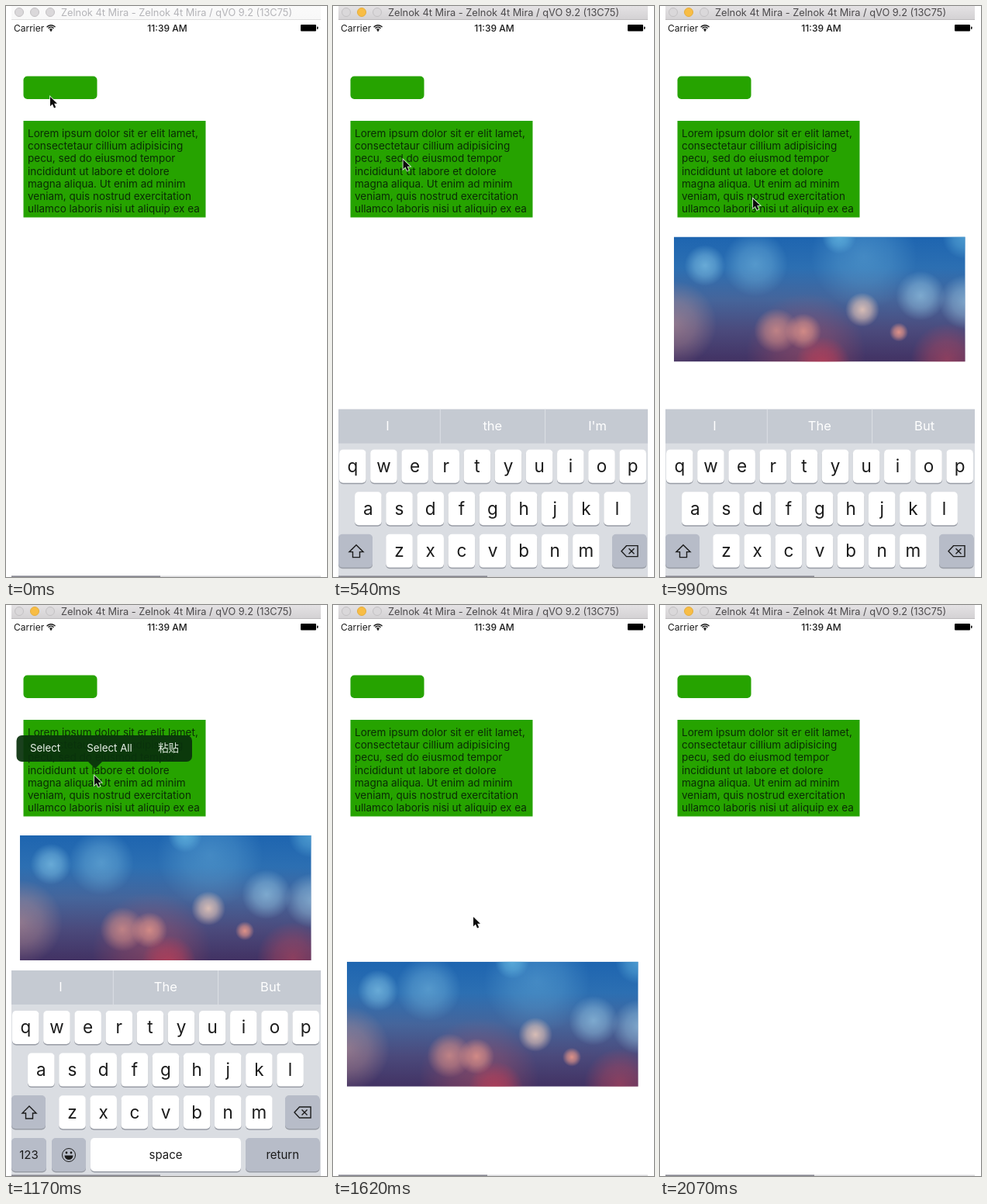
These frames come from a looping animation (414 by 736 pixels, 2160 ms). An HTML page with a canvas:

```html
<!DOCTYPE html>
<html>
<head>
<meta charset="utf-8">
<title>Keyboard and sliding panel</title>
<style>
html, body { margin: 0; width: 100%; height: 100%; overflow: hidden; background: #fff; }
canvas { display: block; }
</style>
</head>
<body>
<canvas id="stage" width="414" height="736"></canvas>
<script>
const c = document.getElementById('stage').getContext('2d');
const LOOP = 2160, STEP = 90, BOTTOM = 736;
const GREEN = '#26a300', INK = '#1b1b1b';
const DEVICE = 'Zelnok 4t Mira';
const TITLE = `${DEVICE} - ${DEVICE} / qVO 9.2 (13C75)`;
const LOREM = [
  'Lorem ipsum dolor sit er elit lamet,',
  'consectetaur cillium adipisicing',
  'pecu, sed do eiusmod tempor',
  'incididunt ut labore et dolore',
  'magna aliqua. Ut enim ad minim',
  'veniam, quis nostrud exercitation',
  'ullamco laboris nisi ut aliquip ex ea'
];

// Places the pointer passes: step, x, y
const POINTER = [[0, 57, 117], [4, 52, 105], [8, 129, 291], [13, 114, 220], [16, 203, 329], [18, 181, 402]];
// Blurred lights in the panel: x, y, radius
const LIGHTS = [[245, 25, 62], [105, 35, 38], [40, 37, 24], [213, 0, 20], [375, 0, 26], [318, 76, 29],
  [377, 84, 32], [170, 150, 70], [0, 112, 50], [132, 121, 26], [167, 122, 21], [243, 94, 20],
  [290, 123, 11], [192, 164, 32], [352, 158, 42]];

const clamp = u => Math.min(1, Math.max(0, u));
const easeOut = u => 1 - (1 - clamp(u)) ** 2;
const easeIn = u => clamp(u) ** 2;
const spring = u => u < 0 ? 0 : 1 - Math.exp(-1.4 * u) * Math.cos(2 * u);

// How far each sliding part is up: 0 hidden, 1 at rest
const keyboardUp = (t, rise, fall) => easeOut((t - rise) / 3.5) - easeIn((t - fall) / 3.5);
const panelUp = (t, rise, fall) => spring(t - rise) * (1 - easeIn((t - fall) / 3));

function pointerAt(t) {
  const i = POINTER.findIndex(p => p[0] > t);
  if (i < 0) return POINTER.at(-1).slice(1);
  const [t0, x0, y0] = POINTER[i - 1], [t1, x1, y1] = POINTER[i];
  const u = (t - t0) / (t1 - t0);
  return [x0 + (x1 - x0) * u, y0 + (y1 - y0) * u];
}

function text(s, x, y, size, color, align = 'left', weight = 400) {
  c.font = `${weight} ${size}px Inter, "Noto Sans CJK SC", "Noto Sans CJK", sans-serif`;
  c.fillStyle = color;
  c.textAlign = align;
  c.fillText(s, x, y);
}

function rect(x, y, w, h, color, r = 0) {
  c.fillStyle = color;
  c.beginPath();
  c.roundRect(x, y, w, h, r);
  c.fill();
}

function shade(height, colors) {
  const g = c.createLinearGradient(0, 0, 0, height);
  colors.forEach((s, i) => g.addColorStop(i / (colors.length - 1), s));
  return g;
}

function trace(points) {
  c.beginPath();
  points.forEach(p => c.lineTo(...p));
  c.closePath();
}

function outline(points) {
  trace(points);
  c.strokeStyle = INK;
  c.lineWidth = 1.4;
  c.stroke();
}

function disc(x, y, r, fill, stroke) {
  c.beginPath();
  c.arc(x, y, r, 0, 7);
  if (fill) { c.fillStyle = fill; c.fill(); }
  if (stroke) { c.strokeStyle = stroke; c.lineWidth = 1; c.stroke(); }
}

function titleBar(active) {
  rect(7, 0, 399, 18, shade(18, active ? ['#e4e2e4', '#d3d1d3'] : ['#fafafa', '#f8f8f8']));
  rect(7, 17, 399, 1, active ? '#bcbabc' : '#dedede');
  for (let i = 0; i < 3; i++) {
    const lit = active && i === 1;
    disc(17 + 20 * i, 8, 5.5, lit ? '#f8bd45' : '#dad8da', lit ? '#e5ad3c' : '#c3c1c3');
  }
  text(TITLE, 71, 13, 12.8, active ? '#4b494b' : '#b4b4b8');
}

function statusBar() {
  text('Carrier', 10, 33, 12, INK);
  c.strokeStyle = INK;
  c.lineWidth = 1.4;
  for (let r = 2.2; r < 8; r += 2.5) {
    c.beginPath();
    c.arc(58, 32, r, -Math.PI * .77, -Math.PI * .23);
    c.stroke();
  }
  disc(58, 31.5, 1.2, INK);
  text('11:39 AM', 208, 33, 12, INK, 'center', 500);
  rect(380, 24, 20, 8.5, '#000', 1);
  rect(401, 26.5, 1.5, 3.5, '#000', 1);
}

function fields(caret) {
  rect(22.5, 90.5, 95, 29.5, GREEN, 5);
  if (caret) rect(29, 98, 2, 16, '#277c78');
  rect(22.5, 148, 235, 124.5, GREEN);
  LOREM.forEach((s, i) => text(s, 28, 169 + i * 16.2, 13.5, '#0a2c05'));
}

// Lights are blue high up, cream in the middle and red near the bottom
function lightColor(y, alpha) {
  const low = y - 94;
  return low < 0 ? `hsla(201,65%,${62 + y * .2}%,${alpha})`
    : `hsla(${20 - low * .4},65%,${84 - low * .42}%,${alpha})`;
}

function panel(y) {
  c.save();
  c.translate(18, y);
  c.beginPath();
  c.rect(0, 0, 375.5, 161);
  c.clip();
  rect(0, 0, 376, 161, shade(161, ['#1e65b0', '#2c6fb2', '#45659b', '#4b4a7c', '#423263']));
  for (const [x, y, r] of LIGHTS) {
    const alpha = Math.min(.95, .15 + 14 / r);
    const glow = c.createRadialGradient(x, y, 0, x, y, r * 1.1);
    [1, .65, 0].forEach((k, i) => glow.addColorStop(i / 2, lightColor(y, alpha * k)));
    disc(x, y, r * 1.1, glow);
  }
  c.restore();
}

function key(x, y, w, label, size, special) {
  rect(x, y + 1, w, 43.5, '#989ca5', 5);
  rect(x, y, w, 43, special ? '#b7bcc8' : '#fff', 5);
  text(label, x + w / 2, y + 22 + size * .33, size, INK, 'center');
}

function smiley(x, y) {
  disc(x, y, 8.5, null, INK);
  disc(x - 3, y - 3, 1.4, INK);
  disc(x + 3, y - 3, 1.4, INK);
  c.beginPath();
  c.arc(x, y + .5, 5.5, 0, Math.PI);
  c.fill();
}

function keyboard(y, words) {
  c.save();
  c.beginPath();
  c.rect(7, 0, 399, BOTTOM);
  c.clip();
  c.translate(0, y);
  rect(7, 0, 399, 270, '#dadde2');
  rect(7, 0, 399, 44, '#c5cad2');
  words.forEach((s, i) => {
    if (i) rect(2.5 + i * 135.3, 0, 1, 44, '#dce0e5');
    text(s, 70.5 + i * 135.3, 27, 16.5, '#fff', 'center');
  });

  ['qwertyuiop', 'asdfghjkl', 'zxcvbnm'].forEach((row, r) => {
    const left = 206 - row.length * 20.07;
    [...row].forEach((s, i) => key(left + 2.7 + i * 40.15, 52 + r * 54.6, 34.6, s, 22.5));
  });
  key(7, 161, 44, '', 15, true);
  key(360, 161, 44.5, '', 15, true);
  outline([[30, 175], [39, 184], [34.5, 184], [34.5, 191], [25.5, 191], [25.5, 184], [21, 184]]);
  outline([[372, 183], [378.5, 176], [393, 176], [393, 190], [378.5, 190]]);
  outline([[381.5, 179.5], [388.5, 186.5]]);
  outline([[388.5, 179.5], [381.5, 186.5]]);

  key(7, 216, 45, '123', 15, true);
  key(59, 216, 44, '', 15, true);
  key(109, 216, 194, 'space', 15);
  key(309, 216, 95.5, 'return', 15, true);
  smiley(81, 238);
  c.restore();
}

function menu(alpha) {
  c.save();
  c.globalAlpha = alpha;
  c.fillStyle = 'rgba(9,50,12,.93)';
  c.beginPath();
  c.roundRect(13.5, 168, 226.5, 34, 7);
  c.moveTo(106, 202);
  c.lineTo(115, 211);
  c.lineTo(124, 202);
  c.fill();
  [['Select', 50.5], ['Select All', 133.5], ['粘贴', 209.5]]
    .forEach(([s, x]) => text(s, x, 189, 13.3, '#e8f0e8', 'center'));
  c.restore();
}

function loupe() {
  c.save();
  c.beginPath();
  c.rect(7, 18, 399, 718);
  c.clip();
  c.shadowColor = 'rgba(0,0,0,.35)';
  c.shadowBlur = 4;
  c.shadowOffsetY = 1;
  disc(48, 44, 60, '#fff', '#b5b8b5');
  c.shadowColor = 'transparent';
  c.beginPath();
  c.arc(48, 44, 59.5, 0, 7);
  c.clip();
  rect(14, 27.5, 120, 35, GREEN, 5);
  rect(22.5, 34, 2.5, 21, '#2878a0');
  c.restore();
}

function pointer(x, y) {
  c.save();
  c.translate(x, y);
  c.scale(.9, .9);
  trace([[0, 0], [0, 13.5], [3.2, 10.6], [5.6, 16], [8, 15], [5.7, 9.8], [10, 9.6]]);
  c.strokeStyle = 'rgba(255,255,255,.8)';
  c.lineWidth = 2;
  c.stroke();
  c.fillStyle = '#0c0c0c';
  c.fill();
  c.restore();
}

function draw(t) {
  const pressed = t >= 2 && t <= 4;
  const again = t >= 9;
  const keys = again ? keyboardUp(t, 9, 13.03) : keyboardUp(t, 2, 4.5);
  const slide = t < 17 ? panelUp(t, 7.18, 13) : panelUp(t, 17.58, 20);

  rect(0, 0, 414, BOTTOM, '#fff');
  statusBar();
  fields(pressed);
  panel(BOTTOM - 439 * slide);
  keyboard(BOTTOM - 265 * keys, again ? ['I', 'The', 'But'] : ['I', 'the', "I'm"]);
  if (t >= 12) menu(clamp((16.5 - t) / 2.3));
  if (pressed) loupe();
  titleBar(t > 0);
  rect(7, 734.5, 399, 1.5, '#d9d9dc');
  rect(7, 734.5, 192, 1.5, '#85858f');
  if (t < 23) pointer(...pointerAt(t));
}

function tick() {
  draw(Math.floor(performance.now() % LOOP / STEP));
  requestAnimationFrame(tick);
}
tick();
</script>
</body>
</html>
```
